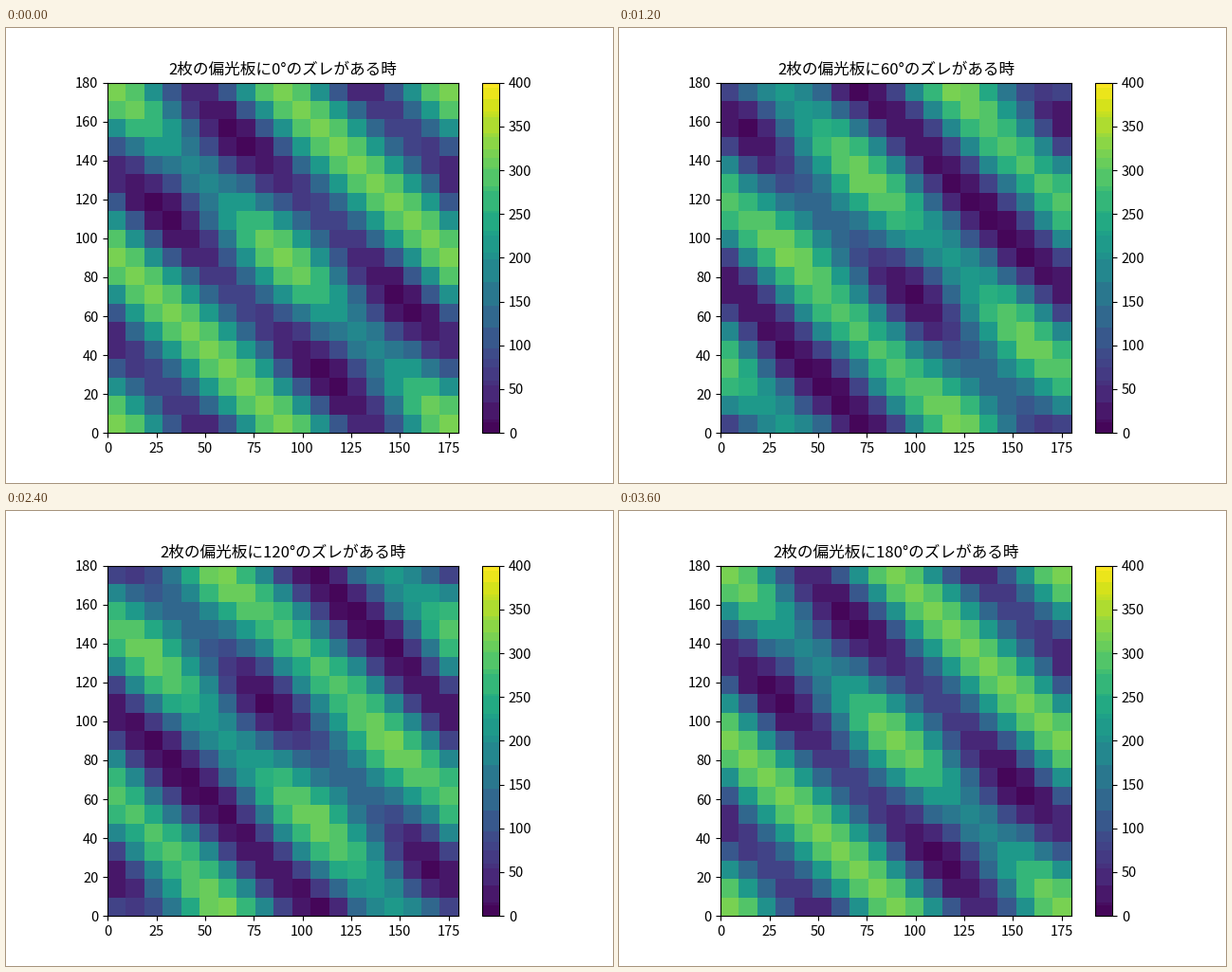
Recreate the animation shown at these times as a matplotlib script. Size 640x480 px, loop 3700 ms.

```python
import numpy as np
import matplotlib.pyplot as plt
from matplotlib.animation import FuncAnimation
from matplotlib.colors import ListedColormap

PEAK = 320
RETARDANCE = np.radians(138)
STEP = 5
FRAMES = 37

plt.rcParams["font.family"] = "Noto Sans CJK JP"
plt.rcParams["font.size"] = 10
plt.rcParams["axes.titlesize"] = 12


def banded_viridis():
    """Viridis reduced to coarse colour bands."""
    rgb = np.round(plt.get_cmap("viridis")(np.arange(256))[:, :3] * 255).astype(int)
    r, g, b = rgb.T
    key = (r // 32) * 256 + (g // 16) * 16 + b // 32
    bands = [rgb[key == k].mean(axis=0) / 255 for k in key]
    return ListedColormap(np.array(bands))


def retard(stokes, angle):
    """Rotate a polarisation state about the fast axis of a wave plate."""
    s1, s2, s3 = stokes
    c, s = np.cos(2 * angle), np.sin(2 * angle)
    cr, sr = np.cos(RETARDANCE), np.sin(RETARDANCE)
    along = c * s1 + s * s2
    across = c * s2 - s * s1
    turned = across * cr - s3 * sr
    return (c * along - s * turned,
            s * along + c * turned,
            across * sr + s3 * cr)


angles = np.radians(np.arange(0, 181, 10))
x, y = np.meshgrid(angles, angles)
state = retard(retard((1.0, 0.0, 0.0), -x), y)


def intensity(offset):
    d = 2 * np.radians(offset)
    return PEAK * (1 + state[0] * np.cos(d) + state[1] * np.sin(d)) / 2


def caption(offset):
    return f"2枚の偏光板に{offset}°のズレがある時"


fig, ax = plt.subplots(figsize=(6.4, 4.8), dpi=100)
image = ax.imshow(intensity(0), cmap=banded_viridis(), vmin=0, vmax=400,
                  origin="lower", extent=(0, 180, 0, 180),
                  interpolation="nearest")
bar = fig.colorbar(image, ax=ax, ticks=range(0, 401, 50))
ax.set_xticks(range(0, 180, 25))
ax.set_yticks(range(0, 181, 20))
for axes in (ax, bar.ax):
    axes.tick_params(labelsize=10.5)
title = ax.set_title(caption(0))


def update(i):
    offset = i * STEP
    image.set_data(intensity(offset))
    title.set_text(caption(offset))
    return image, title


anim = FuncAnimation(fig, update, frames=FRAMES, interval=100,
                     repeat=True, repeat_delay=0, blit=False)
plt.show()
```
